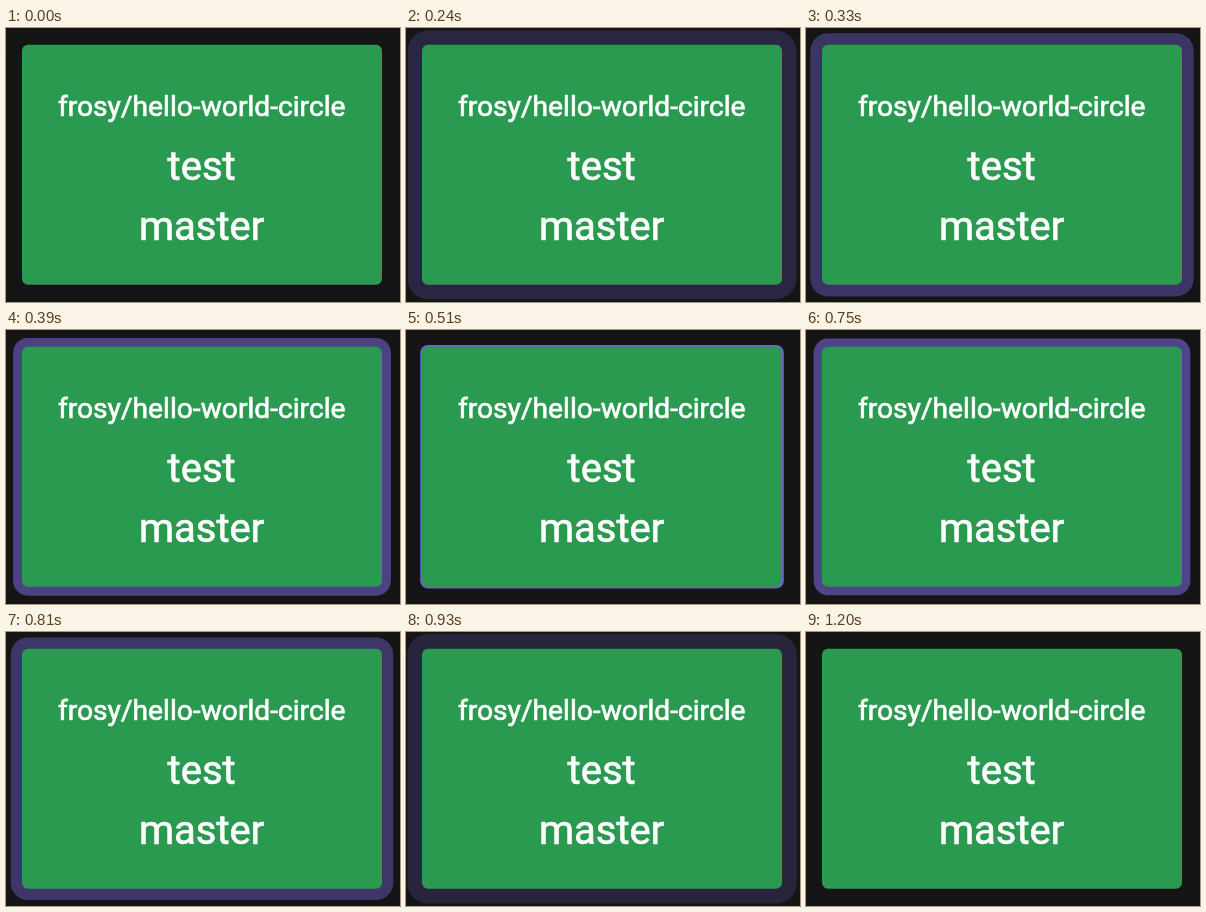
These frames come from a looping animation (394 px wide and 274 px high, 1.29 s). An HTML page:

```html
<!DOCTYPE html>
<html lang="en">
<head>
<meta charset="utf-8">
<title>Build status card</title>
<style>
  html, body { margin: 0; width: 100%; height: 100%; overflow: hidden; background: #151515; }
  svg { display: block; width: 394px; height: 274px; }
  text {
    font: 40px Roboto, sans-serif;
    text-anchor: middle;
    fill: #fff;
    stroke: #fff;
    stroke-width: .7px;
  }
  .repo { font-size: 28.2px; }
</style>
</head>
<body>
<svg viewBox="0 0 394 274">
  <rect id="ring" fill="#7a66e0"/>
  <rect x="16" y="16.8" width="360" height="240" rx="6" fill="#299a4f"/>
  <text class="repo" x="195.7" y="87.5">frosy/hello-world-circle</text>
  <text x="195.6" y="152.2">test</text>
  <text x="195.6" y="212">master</text>
</svg>
<script>
  const LOOP = 1290, STEP = 30, LAST = 1200;
  const PEAK = 575, HALF = 600, SPREAD = 16.8;
  const ring = document.getElementById('ring');

  // CSS "ease": cubic-bezier(.25, .1, .25, 1)
  const bezier = (a, b, u) => 3 * a * u * (1 - u) ** 2 + 3 * b * u * u * (1 - u) + u ** 3;
  function ease(x) {
    if (x >= 1) return 1;
    let lo = 0, hi = 1;
    for (let i = 0; i < 24; i++) {
      const mid = (lo + hi) / 2;
      if (bezier(.25, .25, mid) < x) lo = mid; else hi = mid;
    }
    return bezier(.1, 1, lo);
  }

  // The ring contracts while brightening until PEAK, then plays in reverse.
  function draw(now) {
    const t = Math.min(Math.floor(now % LOOP / STEP) * STEP, LAST);
    const p = ease(Math.abs(t - PEAK) / HALF);
    const s = SPREAD * p;
    const attrs = {
      x: 16 - s, y: 16.8 - s, width: 360 + 2 * s, height: 240 + 2 * s,
      rx: 6 + s, opacity: (1 - p) ** .8
    };
    for (const name in attrs) ring.setAttribute(name, attrs[name]);
  }

  const start = performance.now();
  function tick() {
    draw(performance.now() - start);
    requestAnimationFrame(tick);
  }
  tick();
</script>
</body>
</html>
```
